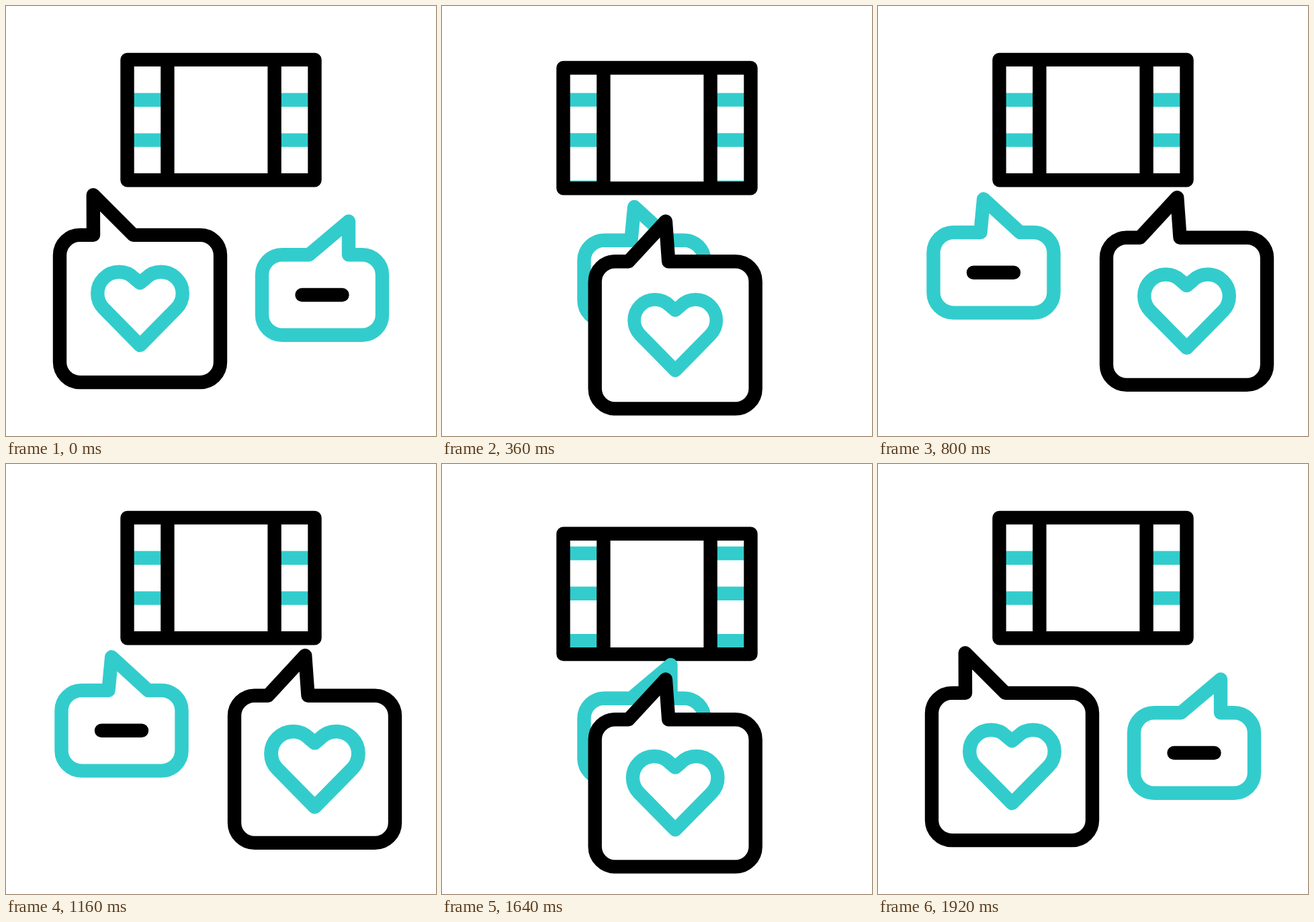
An HTML page for the animation above (2000 ms loop, 640 by 640 pixels).

```html
<!DOCTYPE html>
<html lang="en">
<head>
<meta charset="utf-8">
<title>Film and chat bubbles</title>
<style>
  html, body { margin: 0; height: 100%; overflow: hidden; background: #fff; }
  svg { display: block; width: 100vw; height: 100vh; }
  .ink, .tint { fill: none; stroke-width: 20.4; stroke-linecap: round; stroke-linejoin: round; }
  .ink { stroke: #000; }
  .tint { stroke: #33cccc; }
  .box { fill: #fff; }
</style>
</head>
<body>
<svg viewBox="0 0 640 640">
  <clipPath id="window"><rect id="pane" x="180" y="80" width="280" height="179"/></clipPath>
  <g clip-path="url(#window)">
    <path id="stripes" class="tint" d="M180 139.8h280M180 199.6h280M180 270h280"/>
  </g>
  <g id="film">
    <path fill="#fff" d="M240 80h160v179H240z"/>
    <path class="ink" d="M180.5 79.9h279v179.3h-279zM240.4 80v179M399.6 80v179"/>
  </g>
  <g id="reply">
    <path id="replyBox" class="tint box"/>
    <path id="dash" class="ink" d="M-30 0H30"/>
  </g>
  <g id="like">
    <path id="likeBox" class="ink box"/>
    <path id="heart" class="tint" d="M0-38.2L-8.6-45.4A32 32 0 0 0-53.9-.1L0 54.6L53.9-.1A32 32 0 0 0 8.6-45.4Z"/>
  </g>
</svg>
<script>
const LOOP = 2000, STEP = 40;
const $ = id => document.getElementById(id);
const set = (id, value, name = "transform") => $(id).setAttribute(name, value);
const move = (id, x, y) => set(id, `translate(${x} ${y})`);
const mix = (a, b, u) => a + (b - a) * u;

// Smooth step from 0 to 1
function ease(t, from, to) {
  const u = Math.min(1, Math.max(0, (t - from) / (to - from)));
  return u * u * (3 - 2 * u);
}
// Rises from 0 to 1 at the peak, then falls back to 0
const hump = (t, from, peak, to) => ease(t, from, peak) - ease(t, peak, to);

// Rounded box around (0,0) with a pointed tail on its top edge
function bubble(w, h, left, right, tipX, tipY) {
  const r = 30, corner = (x, y) => `a${r} ${r} 0 0 1 ${x} ${y}`;
  return `M${r - w} ${-h}H${left}L${tipX} ${tipY}L${right} ${-h}H${w - r}${corner(r, r)}` +
    `V${h - r}${corner(-r, r)}H${r - w}${corner(-r, -r)}V${r - h}${corner(r, -r)}Z`;
}

function draw(t) {
  // Film, stripes, dash and heart swing together: down then up, later up then down
  const down1 = hump(t, 50, 290, 460), down = down1 + hump(t, 1477, 1677, 1920);
  const up1 = hump(t, 290, 460, 800), up2 = hump(t, 1160, 1477, 1677), up = up1 + up2;
  const film = 27.7 * down - 14.5 * up;
  move("film", 0, film);
  set("pane", 80 + film, "y");
  move("stripes", 0, 15 * (hump(t, 290, 460, 570) + up2) - 9 * down);
  set("dash", `rotate(${60 * down - 52.4 * up})`);
  set("heart", `scale(${1 - .073 * down1 + .033 * up1 + .05 * hump(t, 980, 1330, 1640)})`);

  // The bubbles trade sides and return
  const swap = ease(t, 120, 560) - ease(t, 1440, 1880);
  const arc = Math.sin(Math.PI * swap);
  move("reply", mix(470.5, 172, swap), mix(430, 396.8, swap) - 2.7 * arc);
  move("like", mix(199.5, 459.5, swap), mix(450.5, 454.3, swap) + 38 * arc);

  const replyFlip = ease(t, 120, 200) - ease(t, 1440, 1520);
  const likeFlip = ease(t, 160, 280) - ease(t, 1720, 1840);
  set("replyBox", bubble(89.5, 59.8, -19.5, 39.5, mix(39.5, -14.8, replyFlip), -109.5), "d");
  set("likeBox", bubble(119.5, 109.6, -69.5, -10, mix(-69.7, -14.3, likeFlip), -169.4), "d");
}

function tick() {
  const t = performance.now() % LOOP;
  draw(Math.floor(t / STEP) * STEP);
  requestAnimationFrame(tick);
}
tick();
</script>
</body>
</html>
```
